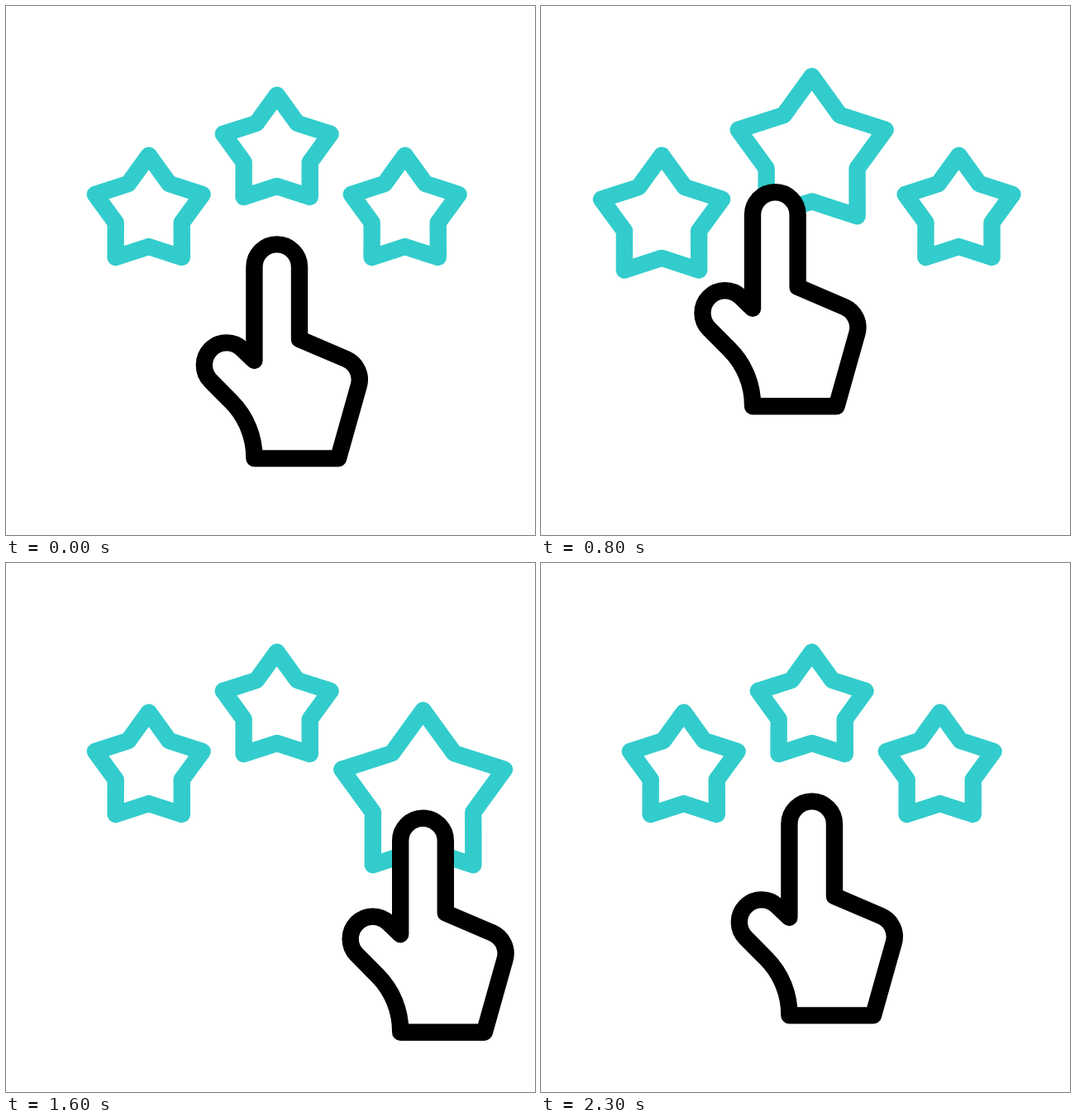
An HTML page for the animation above (2400 ms loop, 640x640 px).

```html
<!DOCTYPE html>
<html lang="en">
<head>
<meta charset="utf-8">
<title>Star rating</title>
<style>
  html, body { margin: 0; height: 100%; overflow: hidden; background: #fff; }
  svg { display: block; width: 100vw; height: 100vh; }
  path { fill: #fff; stroke-width: 20.4; stroke-linejoin: round; }
  .star { stroke: #33cccc; }
  #hand { stroke: #000; }
</style>
</head>
<body>
<svg viewBox="0 0 640 640">
  <path class="star"/>
  <path class="star"/>
  <path class="star"/>
  <path id="hand" d="M300.4 429V315.7a27.2 27.2 0 0 1 54.6 0V403L411.5 427.2A27 27 0 0 1 426.8 459.2L402 547.4H300.4A96 96 0 0 0 272.3 478.4L247.9 453.8A27 27 0 0 1 286 415.2Z"/>
</svg>
<script>
const LOOP = 2400, STEP = 20;
const stars = document.querySelectorAll('.star');
const hand = document.getElementById('hand');

// Each pose: hand offset, then [centre x, centre y, radius] of left, middle and right star
const left = [172.7, 249, 68.2], middle = [327.7, 175.9, 68.2], right = [482.7, 249, 68.2];
const rest = [[0, 0], left, middle, right];
const pressMiddle = [[0, -92.3], [142, 249, 68.2], [327.6, 179.6, 102.5], [513.5, 249, 68.2]];
const pressLeft = [[-171.2, 20.3], [157.5, 281.6, 101.5], middle, right];
const pressRight = [[176.8, 20.3], left, middle, [504.6, 281.7, 103.4]];

// [start, duration, from, to]
const moves = [
  [100, 300, rest, pressMiddle],
  [700, 300, pressMiddle, pressLeft],
  [1300, 300, pressLeft, pressRight],
  [1900, 400, pressRight, rest]
];

function starPath([cx, cy, radius]) {
  const points = Array.from({ length: 10 }, (_, i) => {
    const r = i % 2 ? radius * 0.617 : radius;
    const a = i * Math.PI / 5;
    return [cx + r * Math.sin(a), cy - r * Math.cos(a)].map(v => v.toFixed(2));
  });
  return `M${points.join('L')}Z`;
}

function poseAt(t) {
  const [start, duration, from, to] = moves.findLast(m => t >= m[0]) || moves[0];
  const p = Math.min(1, Math.max(0, (t - start) / duration));
  const k = p * p * (3 - 2 * p);
  return from.map((part, i) => part.map((v, j) => v + (to[i][j] - v) * k));
}

function draw() {
  const t = Math.floor(performance.now() % LOOP / STEP) * STEP;
  const [offset, ...shapes] = poseAt(t);
  hand.setAttribute('transform', `translate(${offset})`);
  shapes.forEach((shape, i) => stars[i].setAttribute('d', starPath(shape)));
  requestAnimationFrame(draw);
}
draw();
</script>
</body>
</html>
```
